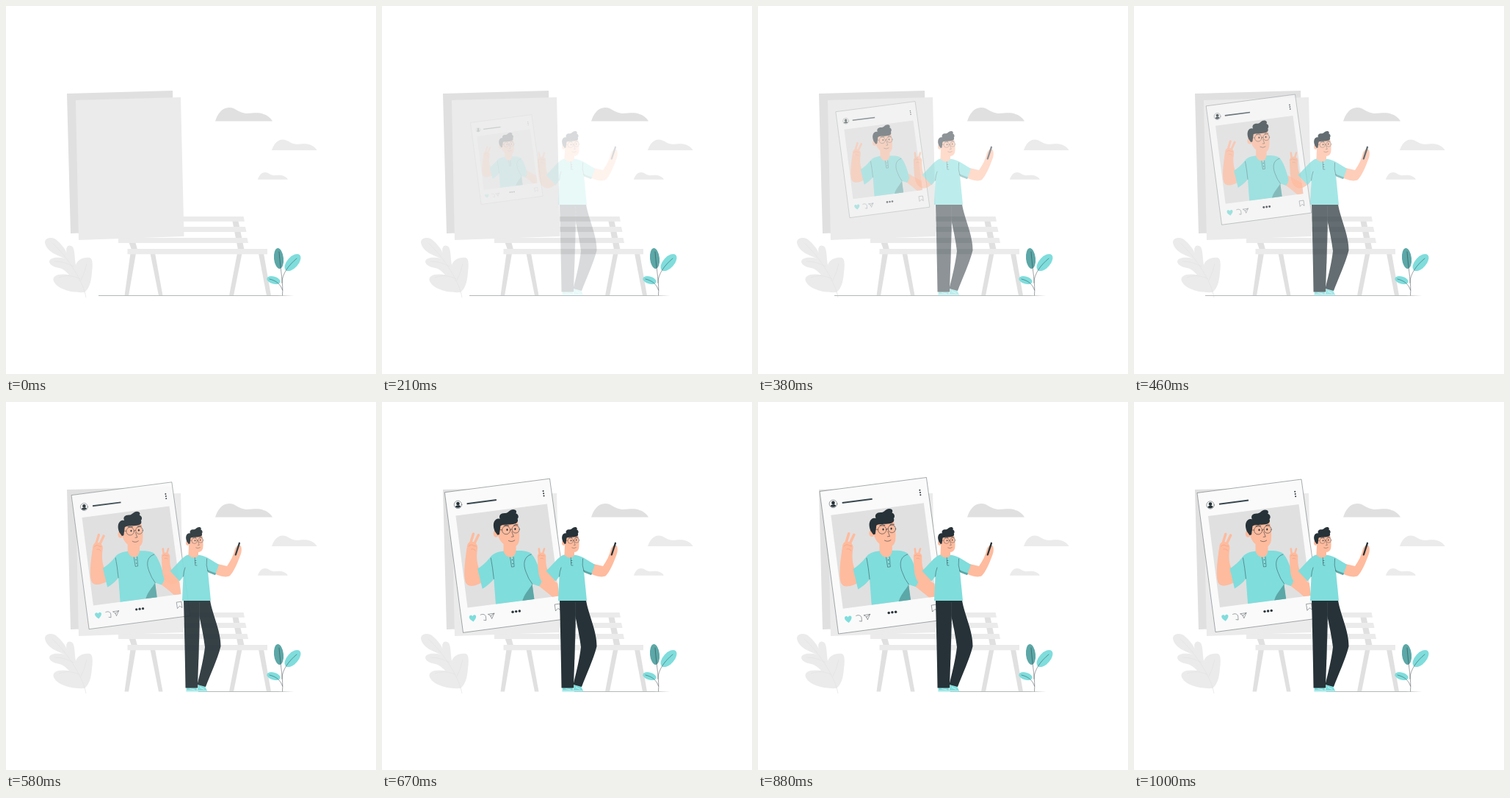
An HTML page for the animation above (1.04 s loop, 504x500 px).

```html
<!DOCTYPE html>
<html lang="en">
<head>
<meta charset="utf-8">
<title>Selfie by the bench</title>
<style>
  html, body { margin: 0; width: 100%; height: 100%; overflow: hidden; background: #fff; }
  svg { display: block; width: 504px; height: 500px; }
  .light { fill: #ebebeb; }
  .grey { fill: #e0e0e0; }
  .teal { fill: #7fdddc; }
  .shade { fill: #5ca7a7; }
  .skin { fill: #ffbb9e; }
  .dark { fill: #263238; }
  .line { fill: none; stroke: #263238; stroke-width: .45; stroke-linecap: round; stroke-linejoin: round; }
  .finger { fill: none; stroke: #ffbb9e; stroke-linecap: round; }
  .crease { fill: none; stroke: #e08d72; stroke-width: .4; stroke-linecap: round; }
</style>
</head>
<body>
<svg viewBox="0 0 504 500">
  <defs>
    <path id="cloud" d="M0 18.5C3 9 9 0 19 0C28 0 31 7 42 8C52 8 58 6 66 9C72 11 76 15 78 18.5Z"/>
    <clipPath id="photo"><path d="M101 155L224.5 139L241 263L117 279Z"/></clipPath>
    <g id="head">
      <path class="skin" d="M249 184L267 181C268.500 187 269 193 268.300 198C267.500 203 263.500 205 259 203.500C254 202 250 198 249 192Z"/>
      <ellipse class="skin" cx="247.400" cy="191.600" rx="2.400" ry="3.300"/>
      <path class="dark" d="M246.300 189.500C244.500 185 244.800 181 247.500 179C249 177.800 251 178.500 251 178.500C249.500 175 252 173 256 173.300C259 173 259.500 170 263 170C265.500 170 266.500 172 265.300 173.500C267.500 174 268.400 177 266.800 178.500C268 181 266 183 263 183.200C259 184 254 183 251.500 184.800L250.500 192.500L248.800 193Z"/>
      <g class="line" style="stroke-width:.36">
        <circle cx="256.600" cy="188.600" r="3.700"/>
        <circle cx="265.200" cy="187.800" r="3.400"/>
        <path d="M260.300 188.100Q261 187.400 261.800 187.800M252.900 188.400L249.500 188.200"/>
        <path d="M261.700 190L263.300 194.400L261.300 194.600M258.700 198Q261.500 199.800 264.300 197.700"/>
        <path stroke-width=".55" d="M254.500 184.600Q257 183.500 259 184.600M263.500 184.300Q265.300 183 267 183.800"/>
      </g>
      <ellipse class="dark" cx="257.500" cy="188.200" rx=".7" ry="1"/>
      <ellipse class="dark" cx="264.700" cy="187.600" rx=".7" ry="1"/>
    </g>
  </defs>

  <path class="grey" d="M83 119L227 115L231.500 304L88 309Z"/>

  <g id="bench">
    <g class="grey">
      <path d="M308 290H316L324.500 331H316Z"/>
      <path d="M167 320H176L179 331H171Z"/>
      <path d="M169.500 336H177L167 393.500H161.500Z"/>
      <path d="M196.500 336H203L213.500 393.500H208Z"/>
      <path d="M315 336H321.500L310 393.500H304Z"/>
      <path d="M344 336H351L361 393.500H355Z"/>
    </g>
    <g class="light">
      <path d="M200 286H323.500L325 292.700H200Z"/>
      <path d="M200 300H326L327.500 307H200Z"/>
      <path d="M153 315H328.500L330 322H153Z"/>
      <path d="M165.500 330H356V337.300H165.500Z"/>
    </g>
  </g>
  <path class="light" d="M95 128L238 124L242.500 313L99 318Z"/>

  <use href="#cloud" class="grey" x="285" y="138"/>
  <use href="#cloud" class="light" transform="translate(362 181.500) scale(.79)"/>
  <use href="#cloud" class="light" transform="translate(343 226) scale(.525)"/>

  <path class="light" d="M53 322C52 314 64 313 69 318C75 323 80 329 82.500 335C81 327 85 324 89 326C94 328 93 339 95 352C97 345 105 341 114 342C119 343 118 354 117 362C116 376 113 384 107 389C90 390 70 385 65 374C62 366 72 363 86 365C80 359 77 357 73 356C66 355 59 352 59 347C60 341 72 341 80 343C68 338 56 334 53 322Z"/>
  <path d="M109 396C106 378 88 345 63 322M101 371C90 365 80 366 72 369M92 354Q80 347 66 347M102 373Q108 360 110 350" fill="none" stroke="#e2e2e2" stroke-width=".7"/>

  <path id="ground" fill="#b4b8ba"/>
  <g id="plant">
    <ellipse class="shade" rx="6.500" ry="14" transform="translate(371.500 343) rotate(-6)"/>
    <ellipse class="teal" rx="7.600" ry="14" transform="translate(390.500 348.500) rotate(42)"/>
    <ellipse class="teal" rx="9.500" ry="5" transform="translate(364.500 372.500) rotate(16)"/>
    <path class="line" d="M376.500 393C378 378 374 360 372 334M375.800 376C376 364 385 352 396 343M376.600 386C374 378 368 373 359 371"/>
  </g>

  <g id="card">
    <path d="M86 123.500L228 105L254 293.500L111 312.500Z" fill="#fafafa" stroke="#263238" stroke-width=".4"/>
    <circle class="line" cx="104" cy="140" r="5.200"/>
    <circle class="dark" cx="104" cy="138.600" r="2.300"/>
    <path class="dark" d="M100.300 143C101 140.500 107 140 107.800 142.500Q104 146 100.300 143Z"/>
    <path d="M116 138.700L156 133.600" stroke="#37474f" stroke-width="2"/>
    <g class="dark">
      <circle cx="219.200" cy="121.800" r="1"/><circle cx="219.700" cy="125" r="1"/><circle cx="220.100" cy="128.200" r="1"/>
      <circle cx="178" cy="284.600" r="1.700"/><circle cx="182.600" cy="284" r="1.700"/><circle cx="187.200" cy="283.400" r="1.700"/>
    </g>
    <path class="teal" d="M124.800 297.800C121 295.500 119 293.500 119.200 291.300C119.600 288.600 122.500 288.500 123.800 290.600C124.800 288 128.200 288 128.500 290.800C128.700 293.300 126.500 295.500 124.800 297.800Z"/>
    <path class="line" d="M134.500 288.500C138 286.500 142 288.500 141.800 292.300L142 296L139 295.600"/>
    <path class="line" d="M145 287.700L153 286.500L149.800 293.800L148.200 290.200ZM148.200 290.200L153 286.500"/>
    <path class="line" d="M235 274.500L241.500 273.600L242.700 282.200L239.300 279.800L236.200 283Z"/>

    <path class="grey" d="M101 155L224.500 139L241 263L117 279Z"/>
    <g clip-path="url(#photo)">
      <path class="skin" d="M116.500 195C114 212 111 232 114 244C117 253 129 250 140 243L132 225C129 216 129 208 130.500 198C130.500 189 118 187 116.500 195Z"/>
      <path class="finger" stroke-width="3.500" d="M121 192L124.800 179.500M126.500 192L131.700 181"/>
      <path class="crease" d="M118.500 196Q122 192.500 125.500 195.500L128.500 196M122 200Q126 199 127.500 202"/>
      <path class="skin" d="M208 240L217 234C226 240 235 243 242 248V270L231 264C223 257 216 252 211 248Z"/>
      <path class="teal" d="M166 202.500C157 203.500 151 206 147.500 211C142 218 136 223 130.500 226.500L137 253.500C143 250 149 245 152.500 240L155.500 280H208L204.500 247L213.500 250Q216.500 247 217.800 241C214 226 209 211 202 205C196 201.500 188 202 182 202Z"/>
      <path class="shade" d="M204.300 247C201 254 192 261 190.500 273H208Z"/>
      <path class="line" d="M203 207C193 210 191.500 220 196 231Q199 240 204.500 247M148.500 212Q151 225 152.500 240"/>
      <path class="skin" d="M165.500 186H182.500V201.500Q182 209 176 211Q168 211 165.500 202.500Z"/>
      <path class="line" d="M174.500 211L176.500 224L180 223.500L179 210.500"/>
      <circle class="dark" cx="177.300" cy="214.500" r=".6"/><circle class="dark" cx="178" cy="219.500" r=".6"/>
      <use href="#head" transform="translate(-215.750 -108.500) scale(1.5)"/>
    </g>
  </g>

  <g id="man">
    <path class="teal" d="M246 387H259L261.500 393.500H245.500Z"/>
    <path class="teal" d="M261 384.500L271 386L274.500 393.500H261Z"/>
    <path d="M246 392.500H273.500M250 389.500L257 391M264 387.500L270 390.500" fill="none" stroke="#e8fafa" stroke-width=".7"/>
    <path class="dark" d="M258 269.500H278C281 288 293 312 292.500 332C288 350 278 371 272 387L260.500 384C264 370 269 350 271 333C269 318 266 302 262 286Z"/>
    <path class="dark" d="M242 269.500H264C264 300 262.500 350 261 388.500H244.500C244 350 243 310 242 269.500Z"/>
    <path d="M263.500 272C264 300 262.500 330 262 350" fill="none" stroke="#4b575d" stroke-width=".4"/>

    <path class="skin" d="M211.800 209C212.500 222 212 235 217 243C223 251 232 248 239 240L226 229C223.500 223 223 218 223.300 209C222 203 213 203 211.800 209Z"/>
    <path class="finger" stroke-width="2.600" d="M214.800 208L213.800 199.500M218.800 207L221 199.500"/>
    <path class="crease" d="M213.500 209Q216 206.500 218 208.700L221 209M216 212.500Q218.500 211.500 220 213"/>
    <path class="skin" d="M284 219L301 223C306 216 310 208 311.800 200C313 196 316 194 319.500 195C321.500 198 321 204 319.500 207.500C315 220 310 231 305 236C299 239.500 290 236 281 232Z"/>
    <path class="teal" d="M248 207.500C240 210 232 222 223.500 229.500L236.500 243.500L241.500 237L240 270H279L275 230L285 235L290 221C283 217 273 209 264 208Z"/>
    <path class="shade" d="M274 228C279 230 283 232 286 232.500L285 235.300L275.300 231.500Z"/>
    <path class="line" d="M241.500 237Q242 230 244 225M273.500 213Q272 222 275 230"/>
    <path class="skin" d="M249 194L262 200V207.500Q261 211 257 211.500Q252 212 248.500 207.500Z"/>
    <path class="line" d="M257.200 211.500L257.800 222H260M257.500 215.500H259M257.600 218.500H259"/>
    <use href="#head"/>
    <path d="M312.800 207.500L317.900 191.800" stroke="#263238" stroke-width="2.300" stroke-linecap="round"/>
  </g>
</svg>
<script>
  const LOOP = 1040, STEP = 41.6, RAMP = 22.85;
  const CENTER = { x: 169.5, y: 208.3 };
  const [card, man, ground] = ['card', 'man', 'ground'].map(id => document.getElementById(id));

  const cubic = (a, b, u) => 3 * (1 - u) ** 2 * u * a + 3 * (1 - u) * u * u * b + u ** 3;

  // cubic-bezier(.36, -.01, .5, 1.38): eases past the end and settles back
  function ease(x) {
    let low = 0, high = 1;
    for (let i = 0; i < 30; i++) {
      const mid = (low + high) / 2;
      if (cubic(.36, .5, mid) < x) low = mid; else high = mid;
    }
    return cubic(-.01, 1.38, low);
  }

  function draw(time) {
    const step = Math.floor((time % LOOP + 4) / STEP) % 25;
    const progress = ease(Math.min(1, step / RAMP));
    const scale = .5 + progress / 2;
    const opacity = Math.max(0, Math.min(1, progress));
    const { x, y } = CENTER;

    card.setAttribute('transform', `translate(${x} ${y}) scale(${scale}) translate(${-x} ${-y})`);
    card.setAttribute('opacity', opacity);
    man.setAttribute('opacity', opacity);

    // the ground follows the card's left edge, then only shows beside the shoes
    const left = step < 14 ? Math.floor(x - 83.5 * scale - 1) : 262;
    ground.setAttribute('d', `M${left} 393H370L393 393.5L370 394H${left}Z`);
  }

  const start = performance.now();
  function tick() {
    draw(performance.now() - start);
    requestAnimationFrame(tick);
  }
  tick();
</script>
</body>
</html>
```
